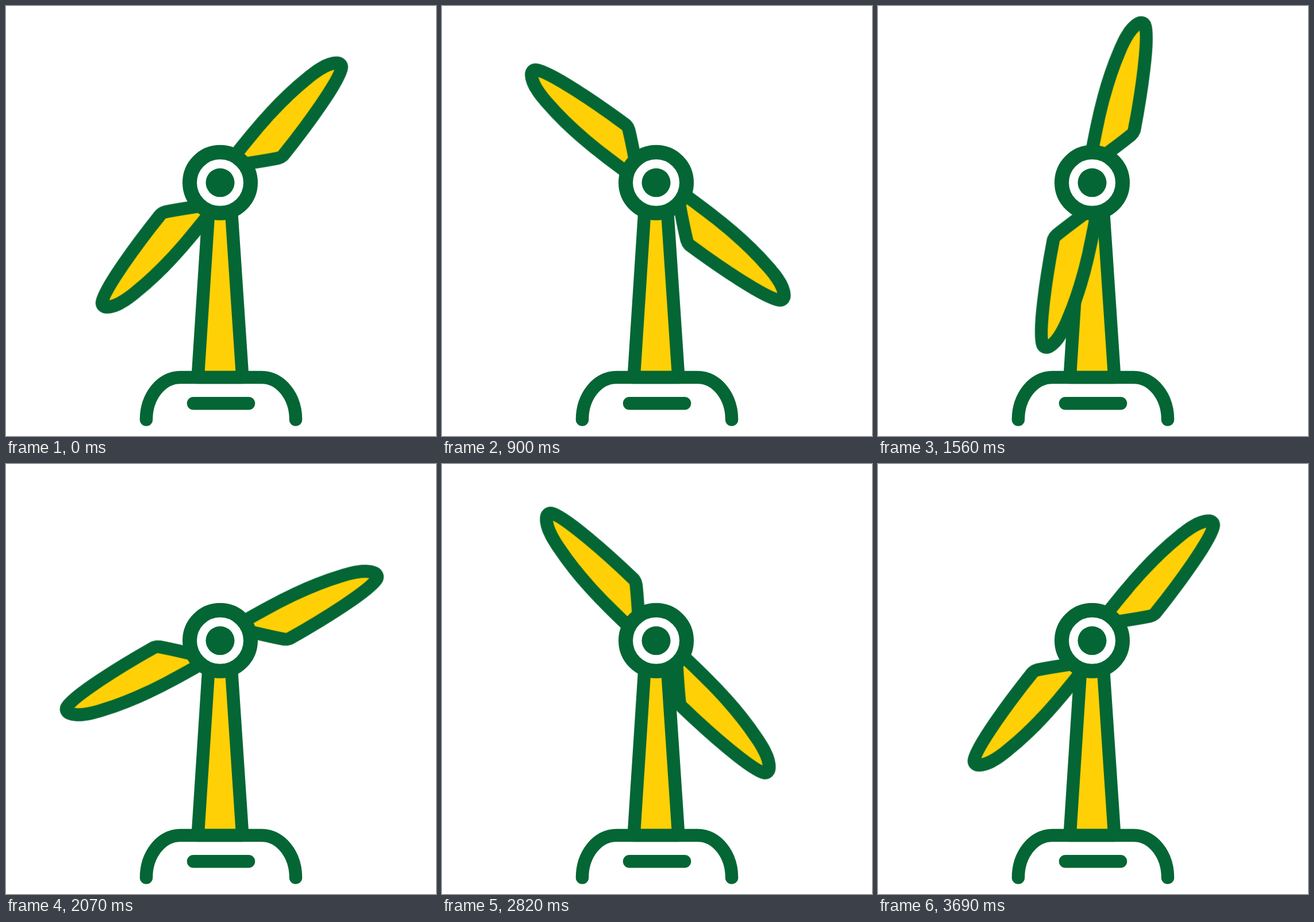
An HTML page that plays this animation: 748 px wide and 748 px high, repeating every 3.72 s.

```html
<!DOCTYPE html>
<html lang="en">
<head>
<meta charset="utf-8">
<title>Wind turbine</title>
<style>
  html, body { margin: 0; width: 100%; height: 100%; overflow: hidden; background: #fff; }
  svg { display: block; width: 100vw; height: 100vh; }
  .line { fill: none; stroke: #046634; stroke-width: 22.5; stroke-linecap: round; stroke-linejoin: round; }
  .solid { fill: #ffd006; }
  #rotor { transform-origin: 375.4px 311.4px; }
</style>
</head>
<body>
<svg viewBox="0 0 748 748">
  <defs>
    <path id="blade" d="M402.5 292.2
      C470 279 530 268.5 588 268.5
      C624 268.5 651 270 665.4 282
      C669 285 670.4 289.6 667 293.4
      C651 309 550 331.5 493 341.9
      Q487.3 343.8 480 340.3
      Q460 329.2 402.5 292.2Z"/>
  </defs>
  <g class="line">
    <path class="solid" d="M354.8 320L333.7 646H411.3L389.6 320Z"/>
    <path d="M244 719.5C244 679 270.5 646 303 646H445C477.5 646 504 679 504 719.5"/>
    <path d="M326 691.2H422"/>
    <g id="rotor">
      <g class="solid" transform="rotate(-40.976 375.4 311.4)">
        <use href="#blade"/>
        <use href="#blade" transform="rotate(180 375.4 311.4)"/>
      </g>
    </g>
  </g>
  <circle cx="372.5" cy="307.3" r="53" fill="#fff" stroke="#046634" stroke-width="25"/>
  <circle cx="372.5" cy="307.3" r="25" fill="#046634"/>
</svg>
<script>
  // A full turn takes 123 ticks; the closing pose holds for one more.
  const TICK = 30, TURN = 123, COUNT = TURN + 1;
  document.getElementById('rotor').animate(
    [{ transform: 'rotate(0deg)' }, { transform: `rotate(${360 * COUNT / TURN}deg)` }],
    { duration: COUNT * TICK, easing: `steps(${COUNT})`, iterations: Infinity }
  );
</script>
</body>
</html>
```
